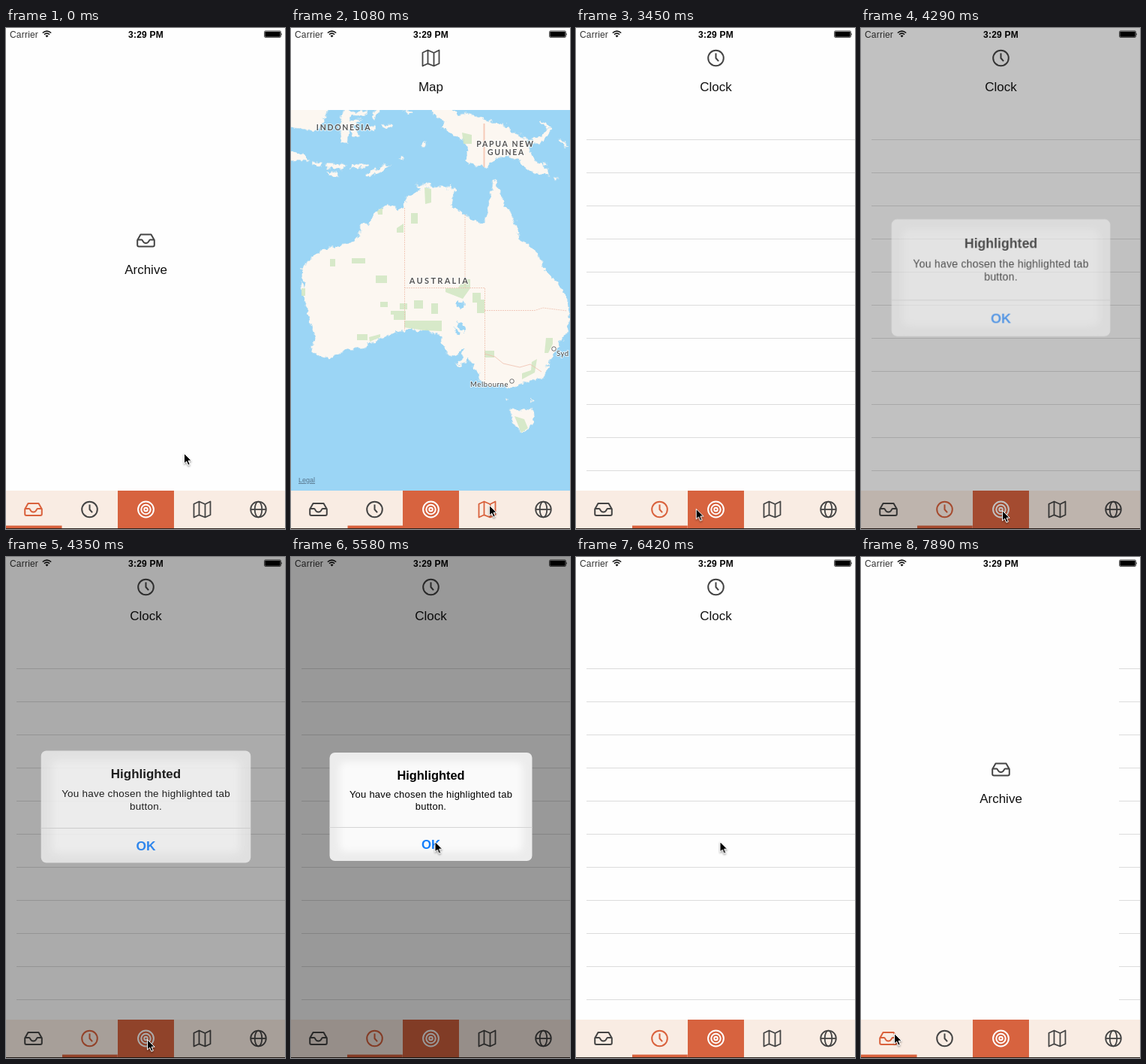
Animation, 372 px wide and 666 px high, one loop 8000 ms. Source, as an HTML page:

```html
<!DOCTYPE html>
<html lang="en">
<head>
<meta charset="utf-8">
<title>Tab bar</title>
<style>
html, body { margin: 0; width: 100%; height: 100%; overflow: hidden; background: #fefefe; }
svg { display: block; }
text { font-family: "Liberation Sans", Arial, sans-serif; text-anchor: middle; }
.title { font-size: 17px; fill: #111; }
.icon { fill: none; stroke: currentColor; stroke-width: 2; stroke-linejoin: round; color: #444; }
.country { font: bold 10.5px Lato, sans-serif; letter-spacing: 1.7px; fill: #555; stroke: #fff; stroke-opacity: .7; stroke-width: 2px; paint-order: stroke; }
.city { font: 9.5px Lato, sans-serif; letter-spacing: .6px; fill: #444; text-anchor: start; stroke: #fff; stroke-opacity: .7; stroke-width: 2px; paint-order: stroke; }

.anim { animation: 8s step-end infinite; }
#archive { animation-name: archive-page; }
#map { animation-name: map-page; }
#clock { animation-name: clock-page; }
#tab-archive { animation-name: archive-tab; }
#tab-map { animation-name: map-tab; }
#tab-clock { animation-name: clock-tab; }
#marker { animation-name: marker; }
#dim { animation-name: dim; }
#alert { animation-name: alert; }
#cursor { animation-name: cursor; }

@keyframes archive-page { 0%, 94.5% { opacity: 1 } 12%, 94.4% { opacity: 0 } 100% { opacity: 1 } }
@keyframes map-page { 0%, 32.25%, 100% { opacity: 0 } 12% { opacity: 1 } }
@keyframes clock-page { 0% { opacity: 0 } 32.25%, 100% { opacity: 1 } }
@keyframes archive-tab { 0%, 94.5%, 100% { color: #d9613c } 12% { color: #444 } }
@keyframes map-tab { 0%, 32.25%, 100% { color: #444 } 12% { color: #d9613c } }
@keyframes clock-tab { 0%, 94.5%, 100% { color: #444 } 32.25% { color: #d9613c } }
@keyframes marker {
  0% { transform: none }
  12% { transform: none; animation-timing-function: ease-in-out }
  15.75% { transform: translateX(224px) }
  32.25% { transform: translateX(224px); animation-timing-function: ease-in-out }
  36% { transform: translateX(74.5px) }
  94.5% { transform: translateX(74.5px); animation-timing-function: ease-in-out }
  98.25%, 100% { transform: none }
}
@keyframes dim {
  0% { opacity: 0 }
  52.7% { opacity: 0; animation-timing-function: cubic-bezier(.2, .8, .3, 1) }
  57.75% { opacity: .4 }
  75% { opacity: .4; animation-timing-function: ease-out }
  80%, 100% { opacity: 0 }
}
@keyframes alert {
  0% { opacity: 0; transform: scale(1.2) }
  52.7% { opacity: 0; transform: scale(1.2); animation-timing-function: cubic-bezier(.2, .8, .3, 1) }
  57.75% { opacity: 1; transform: none }
  75% { opacity: 1; transform: none; animation-timing-function: ease-out }
  80%, 100% { opacity: 0; transform: none }
}
@keyframes cursor {
  0% { transform: translate(237px, 565px) }
  4.875% { transform: translate(237px, 565px); animation-timing-function: ease-in-out }
  9.375% { transform: translate(264px, 634px) }
  23.6% { transform: translate(264px, 634px); animation-timing-function: ease-in-out }
  29.4% { transform: translate(112px, 635px) }
  39.4% { transform: translate(112px, 635px); animation-timing-function: ease-in-out }
  45.9% { transform: translate(188px, 641px) }
  61.1% { transform: translate(188px, 641px); animation-timing-function: ease-in-out }
  69.75% { transform: translate(191.5px, 378px) }
  82.1% { transform: translate(191.5px, 378px); animation-timing-function: ease-in-out }
  91.5%, 100% { transform: translate(44px, 633px) }
}
</style>
</head>
<body>
<svg width="372" height="666" viewBox="0 0 372 666">
  <defs>
    <g id="i-archive">
      <path d="M-11.3-.5L-7-8H7L11.3-.5V6a2 2 0 0 1-2 2H-9.3a2 2 0 0 1-2-2Z"/>
      <path d="M-11.3-1H-5.5C-4-1-4.5 3.5 0 3.5S4-1 5.5-1H11.3"/>
    </g>
    <g id="i-clock"><circle r="10.3"/><path d="M0-6.5V0L3.6 4.2"/></g>
    <g id="i-target"><circle r="10.4"/><circle r="6.2"/><circle r="2.2"/></g>
    <path id="i-map" stroke-width="1.8" d="M-11-7.3L-4-10.5L4-7L11-10.5V7.3L4 10.5L-4 7.3L-11 10.5ZM-4-10.5V7.3M4-7V10.5"/>
    <g id="i-globe" stroke-width="1.8"><circle r="10.3"/><ellipse rx="4.8" ry="10.3"/><path d="M-10 0H10"/></g>
    <pattern id="rows" width="372" height="44" y="148" patternUnits="userSpaceOnUse">
      <path d="M14 .5H372" stroke="#dcdcdc"/>
    </pattern>
    <filter id="coast" x="0" y="109" width="372" height="506" filterUnits="userSpaceOnUse" color-interpolation-filters="sRGB">
      <feTurbulence type="fractalNoise" baseFrequency=".14" numOctaves="3" seed="4"/>
      <feDisplacementMap in="SourceGraphic" scale="9" xChannelSelector="R" yChannelSelector="G"/>
    </filter>
    <filter id="soft" x="-10%" y="-20%" width="120%" height="140%"><feGaussianBlur stdDeviation="5"/></filter>
    <filter id="shadow" x="-50%" y="-50%" width="200%" height="200%">
      <feDropShadow dx="0" dy="1.5" stdDeviation="1.2" flood-opacity=".4"/>
    </filter>
    <clipPath id="map-area"><path d="M0 109H372V615H0Z"/></clipPath>
  </defs>

  <rect width="372" height="666" fill="#fefefe"/>

  <g id="clock" class="anim">
    <use href="#i-clock" class="icon" x="186.5" y="40"/>
    <text class="title" x="186.5" y="84">Clock</text>
    <rect y="148" width="372" height="467" fill="url(#rows)"/>
  </g>

  <g id="map" class="anim">
    <rect y="20" width="372" height="90" fill="#fefefe"/>
    <use href="#i-map" class="icon" x="186.5" y="40"/>
    <text class="title" x="186.5" y="84">Map</text>
    <g clip-path="url(#map-area)">
      <rect y="109" width="372" height="506" fill="#9bd5f5"/>
      <g filter="url(#coast)" fill="#fcf7f1" stroke="#b9dff2" stroke-width=".8">
        <!-- mainland -->
        <path d="M270 201L279 217L284 237L292 243L299 258L305 280L318 290L330 300L336 318L348 330L360 345L368 360L371 378L370 395L364 412L354 425L348 438L341 452L336 467L320 468L305 474L294 480L282 474L265 476L253 470L248 456L241 447L235 436L231 448L222 446L229 435L230 424L220 436L212 437L204 424L200 412L190 405L160 400L130 408L103 420L99 426L72 428L55 437L42 439L27 430L32 410L26 390L16 355L12 335L18 343L14 320L25 308L40 296L80 285L92 275L92 262L98 258L103 262L110 248L130 233L143 243L149 238L154 226L173 214L166 208L195 211L220 213L213 235L248 258L258 258L265 230Z"/>
        <path d="M292 506L305 508L323 506L325 518L318 532L308 538L300 531L294 517Z"/>
        <path d="M286 491l4 3-3 2zM320 492l4 4-4 2zM176 207l10-2 3 5-9 2zM208 213l5-5 2 5zM218 446l12 1-6 4z"/>
        <!-- islands to the north -->
        <path d="M-4 105H52L43 121L40 132L28 138L12 133L-4 130Z"/>
        <path d="M68 112L76 108L86 112L103 109V114L80 118L77 124L95 121L84 130L92 144L84 146L77 135L75 153L68 151L65 133Z"/>
        <path d="M-4 163L15 168L24 178L-4 175ZM28 177L42 180L39 184L28 182ZM47 180L73 182L69 187L47 186ZM79 182L103 180L100 185L80 186ZM47 191L60 192L65 197L52 196ZM99 196L112 187L133 180L124 189L106 198Z"/>
        <path d="M110 107L118 109L112 122L108 116ZM120 128L138 129L136 133L121 132ZM102 131L112 130L112 135L103 135ZM150 109L162 112L157 115ZM174 157L179 150L180 158ZM144 174L149 168L150 174Z"/>
        <path d="M184 105H214L223 115L236 113L258 121L284 129L302 141L314 147L318 163L328 178L342 187L345 198L326 193L312 187L302 175L289 171L274 172L263 184L247 184L231 177L236 162L230 150L216 142L207 134L200 134L207 124L193 118Z"/>
        <path d="M318 148L332 145L342 133L348 134L339 149L326 155ZM332 122L347 132L345 135L330 124ZM358 146L371 158L366 158L357 150ZM335 178L341 180L338 184ZM350 198L358 200L352 202Z"/>
        <path fill="#9bd5f5" stroke="none" d="M221 361L231 366L228 377L222 371ZM221 389L230 393L233 405L226 402ZM217 398L224 405L221 407Z"/>
      </g>
      <g fill="#d3e8c5" opacity=".9">
        <path d="M178 212L187 214V232L179 234ZM160 246H169V260H160ZM141 266L150 260V272H141ZM52 307H59V317H52ZM81 306H99V313H81ZM113 329H128V339H113ZM119 364H129V371H119ZM133 376H153V388H137V381H133ZM145 366H155V374H145ZM164 362H176V373H164ZM187 366H196V380H187Z"/>
        <path d="M151 389H201V403L178 402L151 398ZM206 346H222L232 334H239V346L229 360L206 351ZM242 352H253V361H258V379H248V365H242ZM88 407H102V415H88ZM104 411L119 407V411L105 417ZM228 139L241 142V154H230ZM298 516L311 520L316 532L307 538ZM258 429H271V438H258ZM340 412H349V420L343 432H338ZM321 444L328 440L325 458L308 467V459L320 455ZM14 346H19V356H14ZM115 243L122 239V248H116Z"/>
      </g>
      <g fill="none" stroke="#efbfae" stroke-width=".8">
        <path stroke-dasharray="2 1" d="M151.500 239V402M232 248V345M151 345.500H258.500V470M258 375.500H325L336 372L368 376"/>
        <path d="M258 433L272 437L283 446L305 451L319 447L334 457"/>
        <path stroke="#f6cbb9" stroke-width="2" d="M257.500 127V185"/>
      </g>
      <g fill="#fff" stroke="#666"><circle cx="294.500" cy="469.500" r="2.800"/><circle cx="350.500" cy="426.500" r="2.800"/></g>
      <text class="country" x="70.500" y="136">INDONESIA</text>
      <text class="country" x="286" y="158">PAPUA NEW</text>
      <text class="country" x="287" y="169">GUINEA</text>
      <text class="country" x="198" y="339.500" style="font-size:11px;letter-spacing:2.3px">AUSTRALIA</text>
      <text class="city" x="239" y="476.500">Melbourne</text>
      <text class="city" x="354" y="436">Syd</text>
      <text x="10" y="604" font-size="9" fill="#55738a" style="text-anchor:start;text-decoration:underline">Legal</text>
    </g>
  </g>

  <!-- stops short of the right edge, so the row ends beneath stay visible -->
  <g id="archive" class="anim">
    <rect y="20" width="344" height="595" fill="#fefefe"/>
    <use href="#i-archive" class="icon" x="186.500" y="282.500"/>
    <text class="title" x="186.500" y="327">Archive</text>
  </g>

  <g font-size="12">
    <text x="5" y="12.500" fill="#333" style="text-anchor:start;letter-spacing:.2px">Carrier</text>
    <text x="186.500" y="12.500" font-weight="bold" style="letter-spacing:.2px">3:29 PM</text>
    <path d="M48.800 6.500Q54.500 1.700 60.200 6.500M50.900 8.700Q54.500 5.700 58.100 8.700" fill="none" stroke="#111" stroke-width="1.600"/>
    <path d="M52.500 10.200Q54.500 8.800 56.500 10.200L54.500 12.400Z"/>
    <rect x="344.500" y="3.900" width="22" height="8.600" rx="1.500" fill="none" stroke="#111" stroke-width=".7"/>
    <rect x="345.300" y="4.700" width="20.400" height="7" rx=".8"/>
    <path d="M367.300 6.500q1.500 1.700 0 3.400z"/>
  </g>

  <rect y="615" width="372" height="51" fill="#f9ece3"/>
  <rect x="149" y="615" width="75" height="51" fill="#d7633f"/>
  <rect y="665" width="372" height="1" fill="#2c211d"/>
  <rect id="marker" class="anim" y="661.500" width="74.500" height="3.500" fill="#d9613c"/>
  <use id="tab-archive" class="icon anim" href="#i-archive" x="36.500" y="640"/>
  <use id="tab-clock" class="icon anim" href="#i-clock" x="111.500" y="640"/>
  <use class="icon" href="#i-target" x="186.500" y="640" style="color:#fff"/>
  <use id="tab-map" class="icon anim" href="#i-map" x="261.500" y="640"/>
  <use class="icon" href="#i-globe" x="336.500" y="640"/>

  <rect id="dim" class="anim" width="372" height="666"/>

  <g transform="translate(186.500 332)">
    <g id="alert" class="anim">
      <rect x="-135" y="-72" width="270" height="144" rx="7" fill="#ececec"/>
      <rect x="-122" y="-60" width="244" height="120" rx="8" fill="#fafafa" filter="url(#soft)"/>
      <path d="M-135 27.500H135" stroke="#d4d4d4"/>
      <text y="-36.500" font-size="16.400" font-weight="bold">Highlighted</text>
      <g font-size="13" style="letter-spacing:.23px">
        <text y="-12.500">You have chosen the highlighted tab</text>
        <text y="3.500">button.</text>
      </g>
      <text y="56" font-size="16.800" font-weight="bold" fill="#147efb">OK</text>
    </g>
  </g>

  <g id="cursor" class="anim">
    <path d="M.5.500V14L3.700 11.100L5.900 16.200L8.300 15.200L6.100 10.200H10.200Z" stroke="#fff" stroke-width="1" filter="url(#shadow)"/>
  </g>
</svg>
</body>
</html>
```
